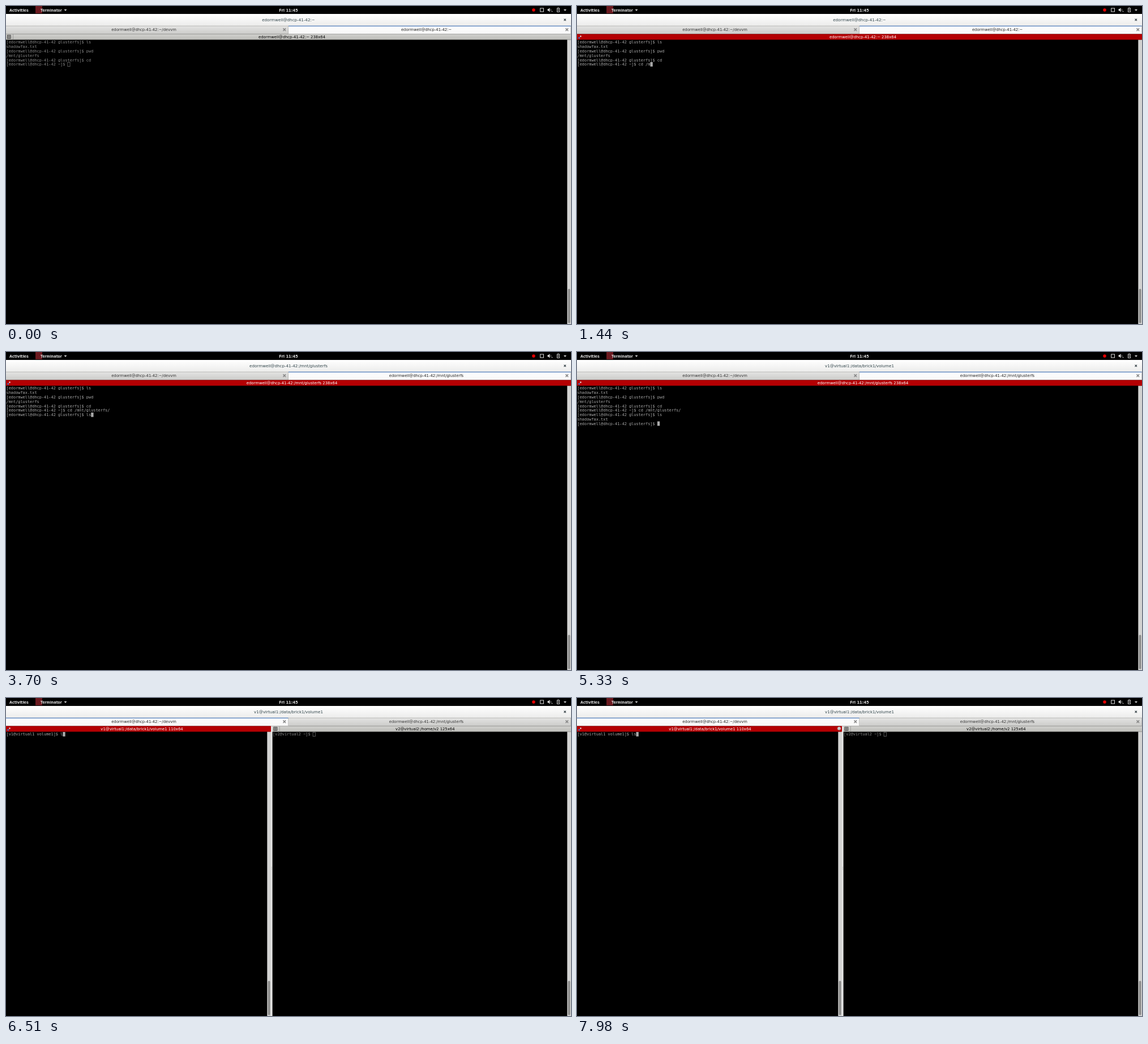
Animation, 998 px wide and 561 px high, one loop 8 s. Source, as an HTML page with a canvas:

```html
<!DOCTYPE html>
<html lang="en">
<head>
<meta charset="utf-8">
<title>Terminal session</title>
<style>
  html, body { margin: 0; width: 100%; height: 100%; overflow: hidden; background: #000; }
  canvas { display: block; }
</style>
</head>
<body>
<canvas id="stage" width="998" height="561"></canvas>
<script>
const ctx = document.getElementById('stage').getContext('2d');
const LOOP = 8000, CELL = 4.158, ROW = 7.8, TOP = 60;
const SANS = '"DejaVu Sans", sans-serif', MONO = '"DejaVu Sans Mono", monospace';
const HOST = 'edormwell@dhcp-41-42';
const HOME = `[${HOST} ~]$ `, MOUNT = `[${HOST} glusterfs]$ `;
const VOLUME = 'v1@virtual1:/data/brick1/volume1';

const CD_KEYS = [[660, 'c'], [740, 'd'], [820, ' '], [1190, '/'], [1440, 'm'], [1620, 'n'],
  [1690, 't'], [2650, '/'], [2820, 'g'], [2980, 'lusterfs/']];
const LS_KEYS = [[3610, 'l'], [3700, 's']];
const VOLUME_KEYS = [[6510, 'l'], [6620, 's']];
const BLINKS = [[2260, 2650], [4880, 5330], [5920, 6510], [7700, 7850]];

const typed = (t, keys) => keys.filter(([at]) => t >= at).map(([, s]) => s).join('');

function rect(x, y, w, h, color) {
  ctx.fillStyle = color;
  ctx.fillRect(x, y, w, h);
}

function gradientRect(x, y, w, h, from, to) {
  const g = ctx.createLinearGradient(0, y, 0, y + h);
  g.addColorStop(0, from);
  g.addColorStop(1, to);
  rect(x, y, w, h, g);
}

// Text is laid out at ten times its size so that fractional advances survive.
function text(s, x, y, size, color, { align = 'left', family = SANS, weight = '' } = {}) {
  ctx.save();
  ctx.translate(x, y);
  ctx.scale(0.1, 0.1);
  ctx.font = `${weight} ${size * 10}px ${family}`;
  ctx.textAlign = align;
  ctx.fillStyle = color;
  ctx.fillText(s, 0, 0);
  ctx.restore();
}

function lines(color, width, ...paths) {
  ctx.strokeStyle = color;
  ctx.lineWidth = width;
  ctx.beginPath();
  for (const [start, ...rest] of paths) {
    ctx.moveTo(...start);
    rest.forEach(p => ctx.lineTo(...p));
  }
  ctx.stroke();
}

function cross(x, y, r, color, width) {
  lines(color, width, [[x - r, y - r], [x + r, y + r]], [[x - r, y + r], [x + r, y - r]]);
}

function polygon(color, ...points) {
  ctx.fillStyle = color;
  ctx.beginPath();
  points.forEach(p => ctx.lineTo(...p));
  ctx.fill();
}

function disc(x, y, r, color) {
  ctx.fillStyle = color;
  ctx.beginPath();
  ctx.arc(x, y, r, 0, 7);
  ctx.fill();
}

function box(x, y, w, h, color, width) {
  ctx.strokeStyle = color;
  ctx.lineWidth = width;
  ctx.strokeRect(x, y, w, h);
}

function drawDesktopBar() {
  const bold = { weight: 'bold' }, ink = '#dedede';
  text('Activities', 6, 9.6, 6.4, ink, bold);
  rect(52, 0, 12, 13, '#6b1a20');
  text('Terminator', 61, 9.6, 6.15, ink, bold);
  polygon(ink, [102.5, 6], [107.5, 6], [105, 8.8]);
  text('Fri 11:45', 499, 9.6, 6.7, ink, { ...bold, align: 'center' });
  disc(932, 7, 2.8, '#e30000');
  box(943.7, 4, 5.8, 6, ink, 1);
  polygon(ink, [956.5, 5.5], [958, 5.5], [960.5, 3.2], [960.5, 10.6], [958, 8.3], [956.5, 8.3]);
  lines('#999', 0.8, [[962, 5], [962.8, 7], [962, 9]]);
  disc(964.5, 9.6, 0.8, ink);
  box(973.4, 4, 4.2, 6.4, ink, 0.9);
  rect(974.6, 2.7, 1.8, 1, ink);
  rect(975, 5.6, 1, 3, ink);
  polygon(ink, [985, 6], [990, 6], [987.5, 8.8]);
}

function drawTab(x, w, title, active) {
  if (active) gradientRect(x, 35, w, 14.5, '#ffffff', '#f6f6f6');
  else gradientRect(x, 35, w, 14.5, '#e4e4e3', '#cbcbc9');
  rect(x, 34.8, w, active ? 1.2 : 0.7, active ? '#4a78b8' : '#a5a5a3');
  rect(x + w - 0.6, 35, 0.6, 14.5, '#a5a5a3');
  text(title, x + w / 2 - 6, 44.3, 6.8, active ? '#222' : '#333', { align: 'center' });
  cross(x + w - 7.2, 41.7, 2.3, '#888', 1.5);
}

function drawPane({ x, w, title, focused, rows, cursor, bell }) {
  const right = x + w;
  if (focused) {
    rect(x, 49.5, w, 10.2, '#b40003');
    rect(x + 2.5, 55, 2.5, 2.5, '#3f78c8');
    rect(x + 5.3, 52.3, 2.3, 2.3, '#e8dede');
  } else {
    gradientRect(x, 49.5, w, 10.2, '#d0d0cd', '#bcbcb8');
    box(x + 2.4, 51.5, 5.8, 5.8, '#333', 0.9);
    lines('#333', 0.8, [[x + 5.3, 51.5], [x + 5.3, 57.3]], [[x + 2.4, 54.4], [x + 8.2, 54.4]]);
    rect(x + 12.2, 50, 0.7, 9.5, '#8c8c8a');
  }
  const center = (x + 12 + right - (bell ? 10 : 0)) / 2;
  text(title, center, 57.1, 6.86, focused ? '#fff' : '#000', { align: 'center' });
  if (bell) {
    disc(right - 5, 53.8, 3, '#c9c9c9');
    disc(right - 4.6, 56.6, 1, '#777');
  }

  rect(x, 59.7, w - 6.7, 502, '#000');
  rect(right - 6.7, 59.7, 6.7, 502, '#d3d3d2');
  ctx.fillStyle = '#8c8c8b';
  ctx.beginPath();
  ctx.roundRect(right - 5.3, 499, 3.8, 60.5, 1.8);
  ctx.fill();

  const left = x + 0.5, ink = focused ? '#aaa' : '#888';
  rows.forEach((s, i) => text(s, left, TOP + i * ROW + 6.3, CELL / 0.602, ink, { family: MONO }));
  const last = rows.length - 1;
  const cx = left + rows[last].length * CELL, cy = TOP + last * ROW;
  if (!focused) box(cx + 0.3, cy + 0.3, CELL, ROW - 0.4, '#8a8a8a', 0.6);
  else if (cursor) rect(cx, cy, CELL + 0.2, ROW, '#aaa');
}

function mountRows(t) {
  const rows = [MOUNT + 'ls', 'shadowfax.txt', MOUNT + 'pwd', '/mnt/glusterfs', MOUNT + 'cd',
    HOME + typed(t, CD_KEYS)];
  if (t >= 3340) rows.push((t >= 3430 ? MOUNT : '') + typed(t, LS_KEYS));
  if (t >= 4280) rows.push('shadowfax.txt', MOUNT);
  return rows;
}

function draw(t) {
  const cursor = !BLINKS.some(([off, on]) => t >= off && t < on);
  const split = t >= 5380;
  const mountTitle = `${HOST}:${t >= 3520 ? '/mnt/glusterfs' : '~'}`;

  rect(0, 0, 998, 561, '#000');
  drawDesktopBar();
  gradientRect(0, 14, 998, 21, '#ffffff', '#ececeb');
  text(t >= 5330 ? VOLUME : mountTitle, 499, 26.8, 7.14, '#30444a', { align: 'center' });
  cross(987.3, 24.3, 1.7, '#2e3a40', 1.1);
  drawTab(0, 499, `${HOST}:~/devvm`, split);
  drawTab(499, 499, mountTitle, !split);

  if (!split) {
    drawPane({ x: 0, w: 998, title: mountTitle + ' 238x64', focused: t >= 110,
      rows: mountRows(t), cursor });
    return;
  }
  rect(467, 49.5, 5, 512, '#e6e6e5');
  drawPane({ x: 0, w: 468, title: VOLUME + ' 110x64', focused: true,
    rows: ['[v1@virtual1 volume1]$ ' + typed(t, VOLUME_KEYS)], cursor, bell: t >= 7850 });
  drawPane({ x: 470.6, w: 527.4, title: 'v2@virtual2:/home/v2 125x64', focused: false,
    rows: ['[v2@virtual2 ~]$ '] });
  for (const y of [298, 300, 302]) rect(468.8, y, 0.8, 0.8, '#999');
}

function tick() {
  draw(performance.now() % LOOP);
  requestAnimationFrame(tick);
}
tick();
</script>
</body>
</html>
```
